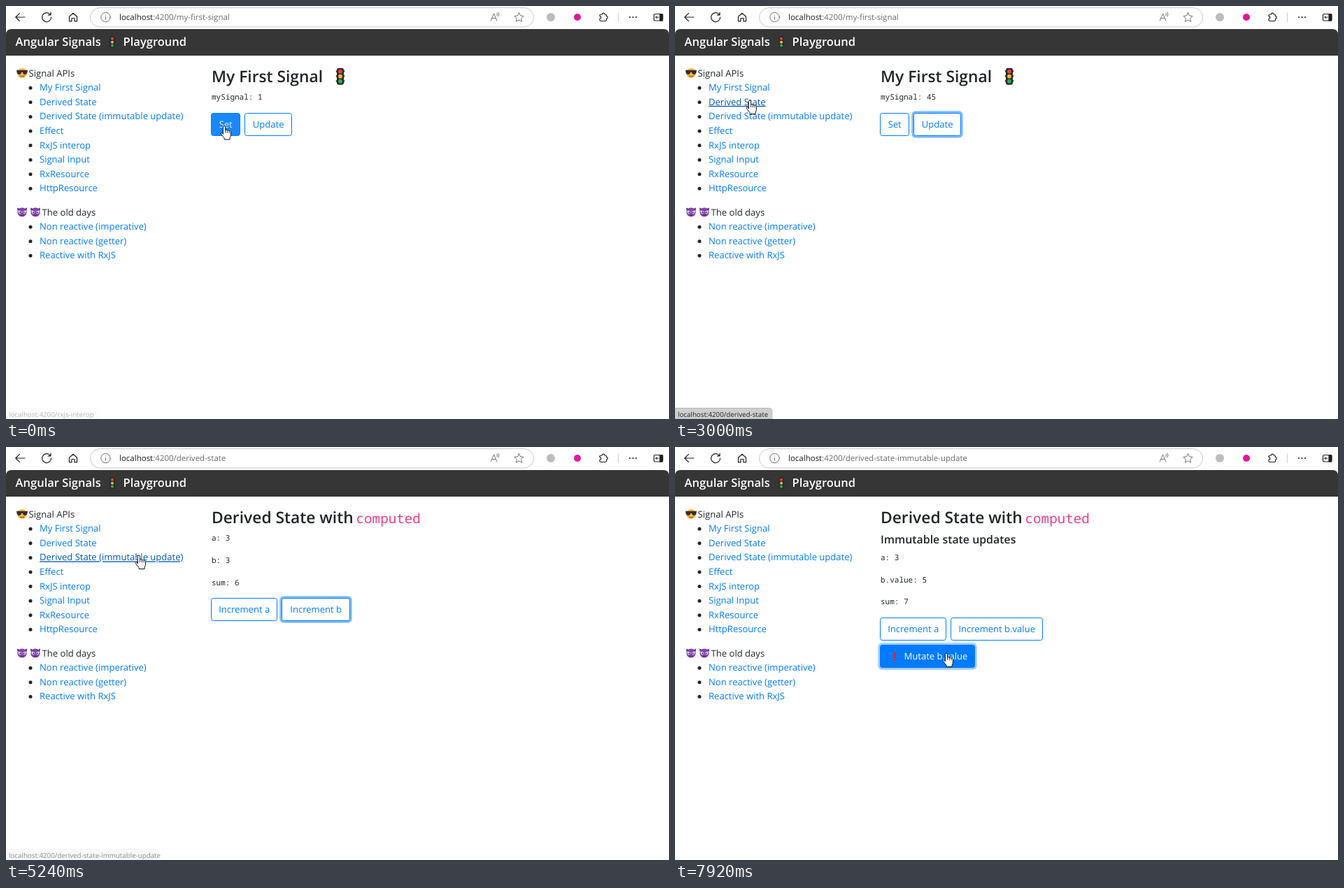
Animation of 948 by 591 pixels, one loop 8000 ms. Source, as an HTML page:

```html
<!DOCTYPE html>
<html lang="en">
<head>
<meta charset="utf-8">
<title>Angular Signals Playground</title>
<style>
  html, body { margin: 0; width: 100%; height: 100%; overflow: hidden; background: #fff; }
  svg { display: block; width: 948px; height: 591px; }
  text { font: 13.05px 'Open Sans', 'Noto Sans', sans-serif; fill: #212529; text-rendering: geometricPrecision; white-space: pre; }
  .brand { font-size: 16.5px; font-weight: 600; fill: #fff; }
  .title { font-size: 22.8px; font-weight: 600; }
  .sub { font-size: 15.9px; font-weight: 600; }
  .url { font-size: 11.5px; fill: #6a6a6a; }
  .host { fill: #1b1b1b; }
  .tip { font-size: 9.75px; fill: #222; }
  .mono { font: 11px 'Noto Sans Mono', 'DejaVu Sans Mono', monospace; }
  .code { font: 19.2px 'Noto Sans Mono', 'DejaVu Sans Mono', monospace; fill: #e83e8c; }
  .link { fill: #007bff; }
  .over { fill: #0056b3; text-decoration: underline; }
  .mid { text-anchor: middle; }
  .ico { fill: none; stroke: #1f1f1f; stroke-width: 1.2; stroke-linecap: round; stroke-linejoin: round; }
  .dim { stroke: #707070; stroke-width: 1; }
</style>
</head>
<body>
<svg viewBox="0 0 948 591">
  <defs>
    <g id="light">
      <path d="M-6.6-8.5H6.6L5-5H-5zM-6.6-1.5H6.6L5 2H-5zM-6.6 5.5H6.6L5 9H-5z" fill="#2b2b2b"/>
      <rect x="-5" y="-12" width="10" height="24" rx="3" fill="#2b2b2b"/>
      <circle cy="-7" r="2.9" fill="#ee3f43"/>
      <circle r="2.9" fill="#f9b62c"/>
      <circle cy="7" r="2.9" fill="#1fae5a"/>
    </g>
    <g id="cool">
      <circle r="7" fill="#fdbb3a"/>
      <path d="M-8-4.2H8L7.4-.5Q6.5 2 4 2T.9-1.3H-.9Q-1.5 2-4 2T-7.4-.5z" fill="#3a2b2e"/>
      <path d="M-3.3 3.6Q0 6 3.3 3.6" fill="none" stroke="#7a431a" stroke-width="1.1"/>
    </g>
    <g id="imp">
      <path d="M-6.8-6.4Q-7.4-3-5.5-1L-2.8-5Q-5.2-5-6.8-6.4zM6.8-6.4Q7.4-3 5.5-1L2.8-5Q5.2-5 6.8-6.4z" fill="#5b2a80"/>
      <circle r="6.6" fill="#8445ae"/>
      <path d="M-5.4-2.6L-.8-.9Q-.8 2.4-3 2.4T-5.4-2.6zM5.4-2.6L.8-.9Q.8 2.4 3 2.4T5.4-2.6z" fill="#f3ecf8"/>
      <circle cx="-2.6" cy=".4" r="1.1" fill="#2d1740"/>
      <circle cx="2.6" cy=".4" r="1.1" fill="#2d1740"/>
      <path d="M-2.6 4.1Q0 5.4 2.6 4.1" fill="none" stroke="#4a2268"/>
    </g>
  </defs>
  <rect width="948" height="591" fill="#fff"/>

  <g class="ico">
    <path d="M27 16H14M19.5 10.3L13.8 16l5.7 5.7"/>
    <path d="M63.3 12.2A6.5 6.5 0 1 0 64.6 16M64 9.2V12.8H60.4"/>
    <path d="M90.5 15.2L96 10.3l5.5 4.9V21.8H98V17.5H94v4.3H90.5z"/>
    <rect x="120.5" y="2.5" width="634" height="27.5" rx="13.75" stroke="#c9c9c9" stroke-width="1"/>
    <g class="dim">
      <circle cx="142.5" cy="16" r="6.7"/>
      <path d="M142.5 15.3v4M142.5 12.8v.2"/>
      <path d="M693.3 21L697.6 10.8 702 21M694.8 17.6h5.6M702 10.2q1.3 1.7 0 3.6M704 9q2.2 3 0 6"/>
      <path d="M733.5 9.6l2 4.2 4.6.6-3.4 3.2.9 4.6-4.1-2.2-4.1 2.2.9-4.6-3.4-3.2 4.6-.6z"/>
    </g>
    <path d="M850.5 12h2a1.8 1.8 0 0 1 3.6 0H857q1.5 0 1.5 1.5V14.6a1.8 1.8 0 0 1 0 3.6V20q0 1.5-1.5 1.5H850.5Q849 21.5 849 20V18.2a1.8 1.8 0 0 0 0-3.6V13.5Q849 12 850.5 12z"/>
    <path d="M875.5 10V22.5" stroke="#d0d0d0" stroke-width="1"/>
    <rect x="926.5" y="11.5" width="12.5" height="9.5" rx="1.6"/>
    <path d="M935 11.5h3.5v9.5H935z" fill="#1f1f1f"/>
    <path d="M933 16.2H929M930.8 14.4L929 16.2l1.8 1.8" stroke-width="1"/>
  </g>
  <circle cx="779" cy="16" r="6" fill="#bdbdbd"/>
  <g fill="#1f1f1f"><circle cx="892" cy="16" r="1.1"/><circle cx="896.5" cy="16" r="1.1"/><circle cx="901" cy="16" r="1.1"/></g>

  <path d="M0 71V41Q0 33 8 33H940Q948 33 948 41V71z" fill="#363636"/>
  <text class="brand" x="13.6" y="57">Angular Signals</text>
  <use href="#light" transform="translate(152 51.7) scale(.7)"/>
  <text class="brand" x="167.6" y="57">Playground</text>

  <use href="#cool" x="23" y="96"/>
  <text x="32.6" y="100.7">Signal APIs</text>
  <use href="#imp" x="23" y="295"/>
  <use href="#imp" x="42" y="295"/>
  <text x="51.6" y="299.7">The old days</text>
  <g id="scene"></g>
  <g id="hand">
    <path d="M-1.6 12V1.6a1.6 1.6 0 0 1 3.2 0V6.4a1.5 1.5 0 0 1 2.8.5 1.5 1.5 0 0 1 2.6.6 1.4 1.4 0 0 1 2.4 1.1V13q0 2.2-1.3 4V19.5H.2V17.6Q-2 15.2-4.6 11.6q-.6-1.6.6-2.2 1-.3 2.4 2.6z"
      fill="#fff" stroke="#111" stroke-width="1" stroke-linejoin="round"/>
    <path d="M1.6 6.4V10M4.4 7V10.2M7 7.8V10.4" fill="none" stroke="#111" stroke-width=".9"/>
  </g>
</svg>
<script>
const LOOP = 8000;
const scene = document.getElementById('scene');
const hand = document.getElementById('hand');

const links = ['My First Signal', 'Derived State', 'Derived State (immutable update)', 'Effect', 'RxJS interop',
  'Signal Input', 'RxResource', 'HttpResource', 'Non reactive (imperative)', 'Non reactive (getter)', 'Reactive with RxJS'];

// button: [label, x, y, width]
const pages = [
  { url: 'my-first-signal', top: 134, vars: ['mySignal'],
    buttons: [['Set', 293, 153, 42], ['Update', 341, 153, 68]] },
  { url: 'derived-state', top: 134, vars: ['a', 'b', 'sum'],
    buttons: [['Increment a', 293, 216, 95], ['Increment b', 394, 216, 98]] },
  { url: 'derived-state-immutable-update', top: 161.7, vars: ['a', 'b.value', 'sum'],
    buttons: [['Increment a', 293, 244, 95], ['Increment b.value', 394, 244, 132], ['Mutate b.value', 293, 283, 136]] }
];

// hot: hovered button, heat: its fade, was: button fading out, ring: focused button, glow: ring strength
const events = [
  [0, { page: 0, vals: [1], hot: 0, heat: .9, was: -1, ring: -1, glow: 0, link: -1, tip: 'rxjs-interop', tipA: .33, icon: 1 }],
  [130, { heat: 1, tipA: 0 }],
  [690, { vals: [42], ring: 0, glow: .6 }],
  [840, { glow: 1 }],
  [1270, { hot: 1, was: 0, heat: .5 }],
  [1420, { heat: 1 }],
  [1820, { vals: [43], ring: 1, glow: .75 }],
  [1950, { glow: 1 }],
  [2220, { vals: [44] }],
  [2350, { vals: [45] }],
  [2480, { hot: -1, was: 1, heat: .5 }],
  [2610, { heat: 1 }],
  [2870, { link: 1, tip: 'derived-state', tipA: .5 }],
  [3000, { tipA: 1 }],
  [3150, { page: 1, vals: [1, 2, 3], was: -1, ring: -1, tipA: 0 }],
  [3300, { link: -1 }],
  [3580, { hot: 0 }],
  [3720, { vals: [2, 2, 4], ring: 0, glow: .75 }],
  [3860, { glow: 1 }],
  [4000, { vals: [3, 2, 5] }],
  [4140, { hot: 1, was: 0, heat: .5 }],
  [4280, { heat: 1 }],
  [4580, { vals: [3, 3, 6], ring: 1, glow: .75 }],
  [4710, { glow: 1 }],
  [4840, { hot: -1, was: 1, heat: .5 }],
  [4960, { heat: 1 }],
  [5220, { link: 2, tip: 'derived-state-immutable-update', tipA: .5 }],
  [5350, { tipA: 1 }],
  [5480, { page: 2, vals: [1, 2, 3], was: -1, ring: -1, tipA: 0, icon: 0 }],
  [5630, { link: -1, icon: 1 }],
  [5900, { hot: 0, heat: .4 }],
  [6020, { heat: 1 }],
  [6150, { vals: [2, 2, 4], ring: 0, glow: .75 }],
  [6290, { glow: 1 }],
  [6430, { vals: [3, 2, 5] }],
  [6680, { hot: 1 }],
  [6950, { vals: [3, 3, 6], ring: 1, glow: .75 }],
  [7100, { vals: [3, 4, 7], glow: 1 }],
  [7220, { hot: -1, was: 1, heat: .6 }],
  [7350, { hot: 2, was: -1, heat: .5 }],
  [7490, { heat: 1 }],
  [7920, { vals: [3, 5, 7], ring: 2, glow: .75 }]
];

// cursor moves: [start, end, steps, x, y]
const moves = [
  [1270, 1420, 2, 365, 175.5], [2480, 2870, 4, 107, 135], [3300, 3580, 3, 340, 231],
  [4140, 4280, 2, 460, 230.5], [4840, 5220, 4, 190, 155], [5630, 5900, 3, 300, 253],
  [6020, 6020, 1, 322, 262], [6680, 6680, 1, 414, 264.5], [7220, 7490, 3, 388, 295]
];

const text = (x, y, str, cls = '') => `<text x="${x}" y="${y}" class="${cls}">${str}</text>`;

function cursorAt(t) {
  let x = 312, y = 171.5;
  for (const [start, end, steps, tx, ty] of moves) {
    if (t < start) break;
    const n = steps > 1 ? Math.floor((t - start) / (end - start) * (steps - 1)) + 1 : 1;
    const p = Math.min(1, n / steps);
    x += (tx - x) * p;
    y += (ty - y) * p;
  }
  return [x, y];
}

function stateAt(t) {
  const s = {};
  for (const [at, change] of events) if (t >= at) Object.assign(s, change);
  return s;
}

function mix(a, b, p) {
  return `rgb(${a.map((v, i) => Math.round(v + (b[i] - v) * p))})`;
}

function button([label, x, y, w], heat, glow) {
  const white = [255, 255, 255], blue = [0, 123, 255], h = 33;
  const mark = label.startsWith('Mutate');
  let out = '';
  if (glow) out += `<rect x="${x - 2.7}" y="${y - 2.7}" width="${w + 5.4}" height="${h + 5.4}" rx="5.6" fill="#007bff" opacity="${glow / 2}"/>`;
  out += `<rect x="${x + .5}" y="${y + .5}" width="${w - 1}" height="${h - 1}" rx="3" fill="${mix(white, blue, heat)}" stroke="#007bff"/>`;
  if (mark) out += `<g transform="translate(${x + 21.3} ${y + 10.5})" fill="#e5242f"><path d="M-2 0H2L1.2 8.3H-1.2z"/><circle cy="11" r="1.7"/></g>`;
  const tx = mark ? x + 80 : x + w / 2 + .2;
  return out + `<text class="mid" x="${tx}" y="${y + 21.4}" style="fill:${mix(blue, white, heat)}">${label}</text>`;
}

function sidebar(over) {
  return links.map((label, i) => {
    const y = i < 8 ? 121.3 + i * 20.57 : 320.2 + (i - 8) * 20.57;
    return `<circle cx="35" cy="${y - 4}" r="2.5" fill="#212529"/>` + text(48, y, label, i === over ? 'link over' : 'link');
  }).join('');
}

function heading(page) {
  if (page === 0) return text(294, 109, 'My First Signal', 'title') + '<use href="#light" x="478" y="100.7"/>';
  return text(294, 109, 'Derived State with', 'title') + text(500.6, 109, 'computed', 'code')
    + (page === 2 ? text(294, 138, 'Immutable state updates', 'sub') : '');
}

function statusTip(path, a) {
  if (!a) return '';
  const w = path.length * 4.6 + 79;
  return `<path d="M0 591V575.5H${w - 4}q4 0 4 4V591z" fill="#cfcfcf" stroke="#b5b5b5" opacity="${a ** 3}"/>`
    + `<g opacity="${a}">${text(4, 588.3, 'localhost:4200/' + path, 'tip')}</g>`;
}

function draw(s) {
  const page = pages[s.page];
  const vars = page.vars.map((name, i) => text(294, page.top + i * 31.8, `${name}: ${s.vals[i]}`, 'mono'));
  const buttons = page.buttons.map((b, i) =>
    button(b, i === s.hot ? s.heat : i === s.was ? 1 - s.heat : 0, i === s.ring ? s.glow : 0));
  return text(162, 20.4, `<tspan class="host">localhost</tspan>:4200/${page.url}`, 'url')
    + `<circle cx="817" cy="16" r="5" fill="${s.icon ? '#e0189a' : '#9a9a9a'}"/>`
    + sidebar(s.link) + heading(s.page) + vars.join('') + buttons.join('') + statusTip(s.tip, s.tipA);
}

let last = '';
function frame() {
  const t = performance.now() % LOOP;
  const html = draw(stateAt(t));
  if (html !== last) scene.innerHTML = last = html;
  hand.setAttribute('transform', `translate(${cursorAt(t).join(' ')})`);
  requestAnimationFrame(frame);
}
frame();
</script>
</body>
</html>
```
